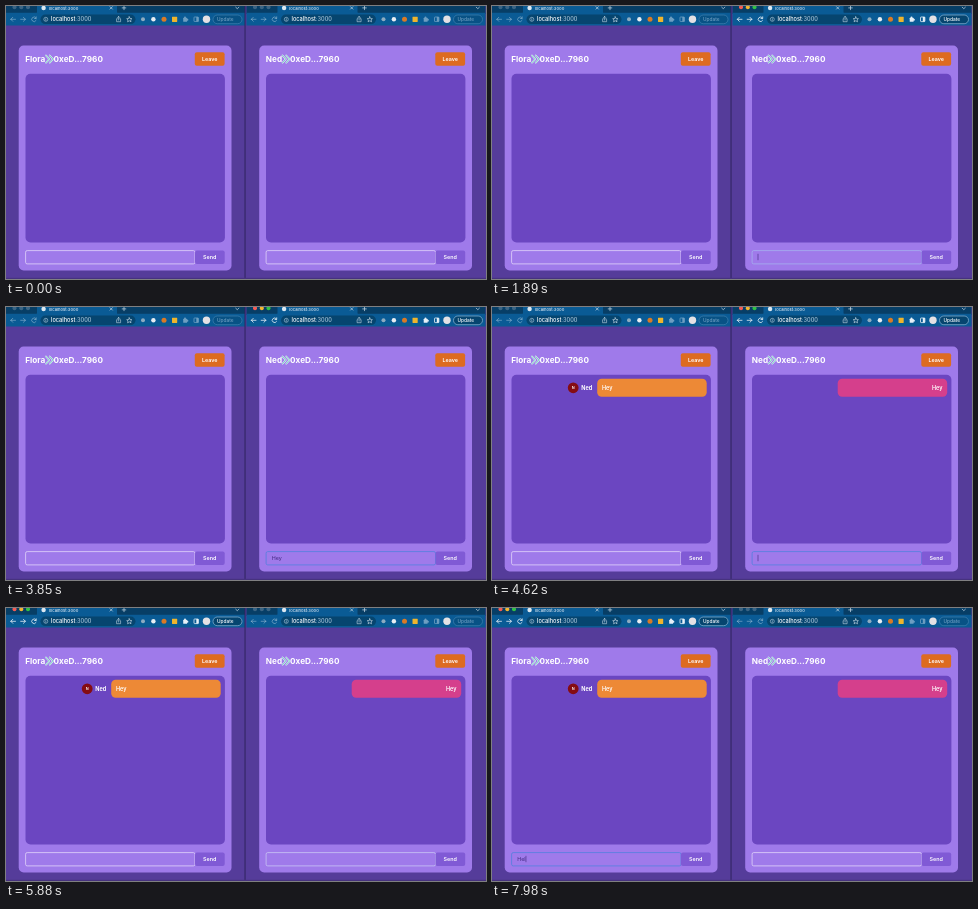
Write an HTML page that moves like this. It is 480 px wide and 273 px high and loops after 8000 ms.

```html
<!DOCTYPE html>
<html lang="en">
<head>
<meta charset="utf-8">
<title>Two-window chat</title>
<style>
  html, body { margin: 0; width: 100%; height: 100%; overflow: hidden; background: #553c9a; }
  svg { display: block; width: 100vw; height: 100vh; font-family: Inter, "Open Sans", sans-serif; }
</style>
</head>
<body>
<svg id="stage" viewBox="0 0 480 273" preserveAspectRatio="none"></svg>
<script>
const LOOP = 8000, BLINK = 500, FADE = 170;
const ADDRESS = '0xeD...7960';
const stage = document.getElementById('stage');

const box = (x, y, w, h, r, fill, more = '') =>
  `<rect x="${x}" y="${y}" width="${w}" height="${h}" rx="${r}" fill="${fill}" ${more}/>`;
const dot = (x, y, r, fill, more = '') => `<circle cx="${x}" cy="${y}" r="${r}" fill="${fill}" ${more}/>`;
const line = (d, color, width = 0.8) =>
  `<path d="${d}" fill="none" stroke="${color}" stroke-width="${width}" stroke-linecap="round" stroke-linejoin="round"/>`;
const text = (x, y, size, weight, str, more = 'fill="#fff"') =>
  `<text x="${x}" y="${y}" font-size="${size}" font-weight="${weight}" ${more}>${str}</text>`;

const middle = 'text-anchor="middle" fill="#fff"';
const arrows = 'M9.5 13.3H4.8m2-2-2 2 2 2M14.7 13.3h4.7m-2-2 2 2-2 2M30 12a2.3 2.3 0 1 0 .1 2.4M30.2 10.8v1.7h-1.7';

function browser() {
  return box(0, 0, 239, 8, 0, '#073e66') +
    '<path d="M29 8q2 0 2-2V0H111V6q0 2 2 2z" fill="#0a5b95"/>' +
    box(0, 6.8, 239, 12.7, 0, '#0a5b95') +
    `<g class="lights-off">${[8.5, 15.3, 22].map(x => dot(x, 1.2, 2, '#3b6585')).join('')}</g>` +
    `<g class="active">${dot(8.5, 1.2, 2, '#f45c53')}${dot(15.3, 1.2, 2, '#f3b62f')}${dot(22, 1.2, 2, '#32c146')}</g>` +
    dot(37.6, 2, 2.2, '#dce8f1') +
    text(42.8, 3.6, 4.1, 500, 'localhost:3000', 'fill="#dce9f3"') +
    line('M104 .7l2.4 2.4m0-2.4-2.4 2.4M116.2 1.9h3.6M118 .1v3.6', '#c9dce9', 0.7) +
    line('M229.7 1.2l1.6 1.5 1.6-1.5', '#c9dce9', 0.7) +
    `<g class="dim">${line(arrows, '#e6f0f7')}</g>` +
    box(34.5, 8.5, 95, 9.6, 4.8, '#06456f') +
    dot(39.8, 13.3, 2, 'none', 'stroke="#b3cbdc" stroke-width=".6"') +
    line('M39.8 13.2v1.1M39.8 12.2v0', '#b3cbdc', 0.6) +
    text(45, 15.3, 5.6, 500, 'localhost<tspan fill="#9fbdd2">:3000</tspan>') +
    line('M111.3 12.7h-.7v3h4v-3h-.7M112.6 14v-3.6m-1.1 1.1 1.1-1.1 1.1 1.1', '#c3d6e3', 0.6) +
    line('M123.3 10.8l.8 1.7 1.8.2-1.3 1.2.4 1.9-1.7-1-1.7 1 .4-1.9-1.3-1.2 1.8-.2z', '#d6e4ee', 0.6) +
    dot(137, 13.3, 2, '#8cabc0') +
    dot(147.4, 13.3, 2.2, '#e9eef2') +
    dot(158, 13.3, 2.5, '#d97a25') +
    box(166, 10.7, 5.2, 5.2, 0.4, '#efb52c') +
    `<g class="dim">${box(177.2, 11.8, 3.9, 4, 0.5, '#e6f0f7')}${dot(179, 11.4, 1, '#e6f0f7')}${dot(181.4, 13.7, 1, '#e6f0f7')}` +
    box(188, 11, 4.4, 4.6, 0.6, 'none', 'stroke="#e6f0f7" stroke-width=".8"') + box(190.3, 11, 2.1, 4.6, 0, '#e6f0f7') + '</g>' +
    dot(200.5, 13.3, 3.7, '#e4e1e4') +
    `<g class="pill">${box(207, 9, 29, 8.7, 4.3, '#06456f', 'stroke="#8fb9d8" stroke-width=".7"')}` +
    text(211, 15.1, 4.8, 500, 'Update') + '</g>';
}

function card(name, mark) {
  return box(12.7, 39.5, 212.8, 225, 5, '#9f7aea') +
    text(19.3, 55.6, 8.2, 700, name) +
    line(`M${mark + 1} 49.5l3.3 3.6-3.3 3.6m3.7-7.2 3.3 3.6-3.3 3.6`, '#dff7f1', 1.7) +
    line(`M${mark + 1} 49.5l3.3 3.6-3.3 3.6m3.7-7.2 3.3 3.6-3.3 3.6`, '#57b9b6', 0.7) +
    text(mark + 8.6, 55.6, 8.2, 700, ADDRESS) +
    box(188.8, 46.3, 29.8, 13.4, 2, '#dd6b20') +
    text(203.7, 55, 5.4, 600, 'Leave', middle) +
    box(19.5, 67.7, 199.4, 168.7, 5, '#6b46c1') +
    box(19.6, 244.6, 169.4, 13.3, 1.6, 'none', 'class="input" stroke-width=".8"') +
    text(25.2, 253.1, 5.4, 400, '', 'class="typed" fill="#40277f"') +
    box(0, 247.8, 0.6, 6.4, 0, '#40277f', 'class="caret"') +
    box(189, 244.4, 29.7, 13.7, 2, '#805ad5') +
    text(203.7, 253.1, 5.4, 600, 'Send', middle);
}

const received =
  dot(81.2, 80.8, 5.4, '#850c12') + text(81.2, 82.2, 3.8, 600, 'N', middle) +
  text(89.3, 82.8, 5.5, 700, 'Ned') +
  box(105.2, 71.8, 109.5, 18, 4.5, '#ed8936') + text(110, 82.9, 5.5, 600, 'Hey');
const sent =
  box(105.2, 71.8, 109.5, 18, 4.5, '#d53f8c') +
  text(210, 82.9, 5.5, 600, 'Hey', 'text-anchor="end" fill="#fff"');

// keys: [time, content of the input after that key]
const panes = [
  { x: 0, name: 'Flora', mark: 39, bubble: received, shown: 4480,
    active: [5740, LOOP], focus: [6580, LOOP],
    keys: [[7700, 'H'], [7800, 'He'], [7910, 'Hel']] },
  { x: 240.5, name: 'Ned', mark: 35, bubble: sent, shown: 4270,
    active: [1820, 5740], focus: [1820, 5740],
    keys: [[3150, 'H'], [3260, 'He'], [3350, 'Hey'], [4270, '']] }
];

stage.innerHTML = box(0, 0, 480, 273, 0, '#553c9a') + panes.map(p =>
  `<g class="pane" transform="translate(${p.x})">${browser()}${card(p.name, p.mark)}<g class="bubble">${p.bubble}</g></g>`
).join('') + box(238.2, 0, 1.7, 273, 0, '#30255f', 'opacity=".6"') + box(0, 271.8, 480, 1.2, 0, '#46327f');

document.querySelectorAll('.pane').forEach((g, i) => {
  const find = c => [...g.querySelectorAll('.' + c)];
  Object.assign(panes[i], {
    on: find('active'), off: find('lights-off'), dim: find('dim'), pill: find('pill')[0],
    input: find('input')[0], typed: find('typed')[0], caret: find('caret')[0], msg: find('bubble')[0]
  });
});

const within = (t, [a, b]) => t >= a && t < b;
const ramp = (t, start) => Math.min(1, Math.max(0, (t - start) / FADE));
const IDLE = [224, 212, 249], FOCUS = [82, 128, 222];

function draw(t) {
  for (const p of panes) {
    const active = within(t, p.active), focused = within(t, p.focus);
    const show = (el, yes) => el.setAttribute('opacity', yes ? 1 : 0);
    p.on.forEach(el => show(el, active));
    p.off.forEach(el => show(el, !active));
    p.dim.forEach(el => el.setAttribute('opacity', active ? 1 : 0.45));
    p.pill.setAttribute('opacity', active ? 1 : 0.4);
    show(p.msg, t >= p.shown);

    const k = ramp(t, p.focus[0]) - ramp(t, p.focus[1]);
    const mix = IDLE.map((c, i) => Math.round(c + (FOCUS[i] - c) * k));
    p.input.setAttribute('stroke', `rgb(${mix})`);

    const key = p.keys.filter(([at]) => at <= t).pop() || [p.focus[0], ''];
    p.typed.textContent = key[1];
    const width = key[1] ? p.typed.getComputedTextLength() : 0;
    p.caret.setAttribute('x', 25.2 + width);
    show(p.caret, focused && Math.floor((t - key[0]) / BLINK) % 2 === 0);
  }
}

const start = performance.now();
function tick() {
  draw((performance.now() - start) % LOOP);
  requestAnimationFrame(tick);
}
tick();
</script>
</body>
</html>
```
